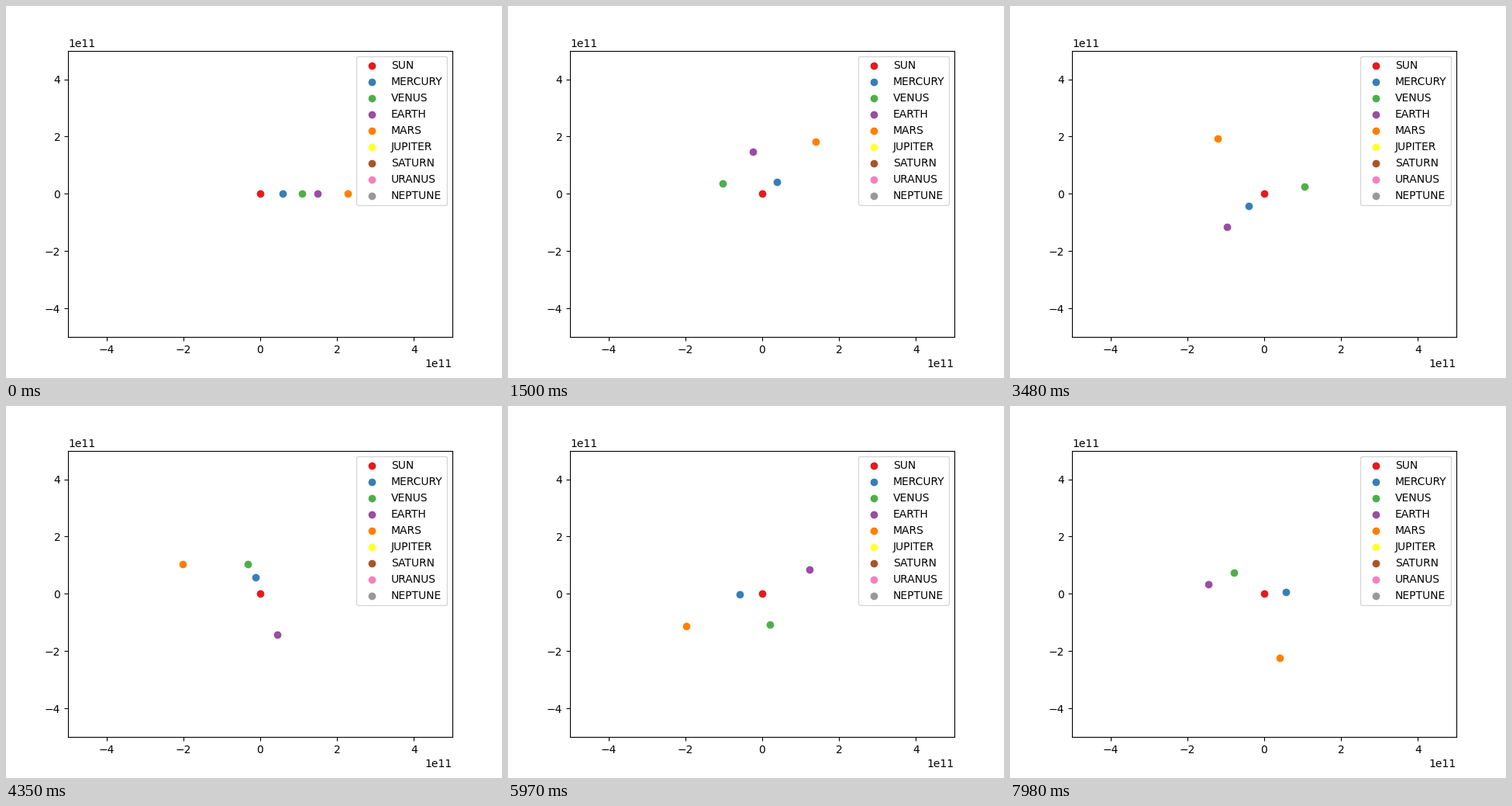
These frames come from a looping animation (640 by 480 pixels, 8000 ms). A matplotlib script:

```python
import numpy as np
import matplotlib.pyplot as plt
from matplotlib.animation import FuncAnimation

LOOP_MS = 8000
FRAMES = 267
STEP = 173700  # simulated seconds per frame
LIMIT = 5e11

# name, orbit radius (m), orbital speed (m/s)
BODIES = [
    ("SUN", 0, 0),
    ("MERCURY", 57.9e9, 47.4e3),
    ("VENUS", 108.2e9, 35.0e3),
    ("EARTH", 149.6e9, 29.8e3),
    ("MARS", 227.9e9, 24.1e3),
    ("JUPITER", 778.6e9, 13.1e3),
    ("SATURN", 1433.5e9, 9.7e3),
    ("URANUS", 2872.5e9, 6.8e3),
    ("NEPTUNE", 4495.1e9, 5.4e3),
]


def position(radius, speed, frame):
    angle = speed / radius * STEP * frame if radius else 0
    return radius * np.cos(angle), radius * np.sin(angle)


fig, ax = plt.subplots(figsize=(6.4, 4.8), dpi=100)
ax.set_xlim(-LIMIT, LIMIT)
ax.set_ylim(-LIMIT, LIMIT)

colors = plt.get_cmap("Set1").colors
dots = [
    ax.scatter(radius, 0, color=color, label=name)
    for (name, radius, _), color in zip(BODIES, colors)
]
ax.legend(loc="upper right")


def update(frame):
    for dot, (_, radius, speed) in zip(dots, BODIES):
        dot.set_offsets([position(radius, speed, frame)])
    return dots


anim = FuncAnimation(fig, update, frames=FRAMES, interval=LOOP_MS / FRAMES,
                     repeat=True, repeat_delay=0)
plt.show()
```
